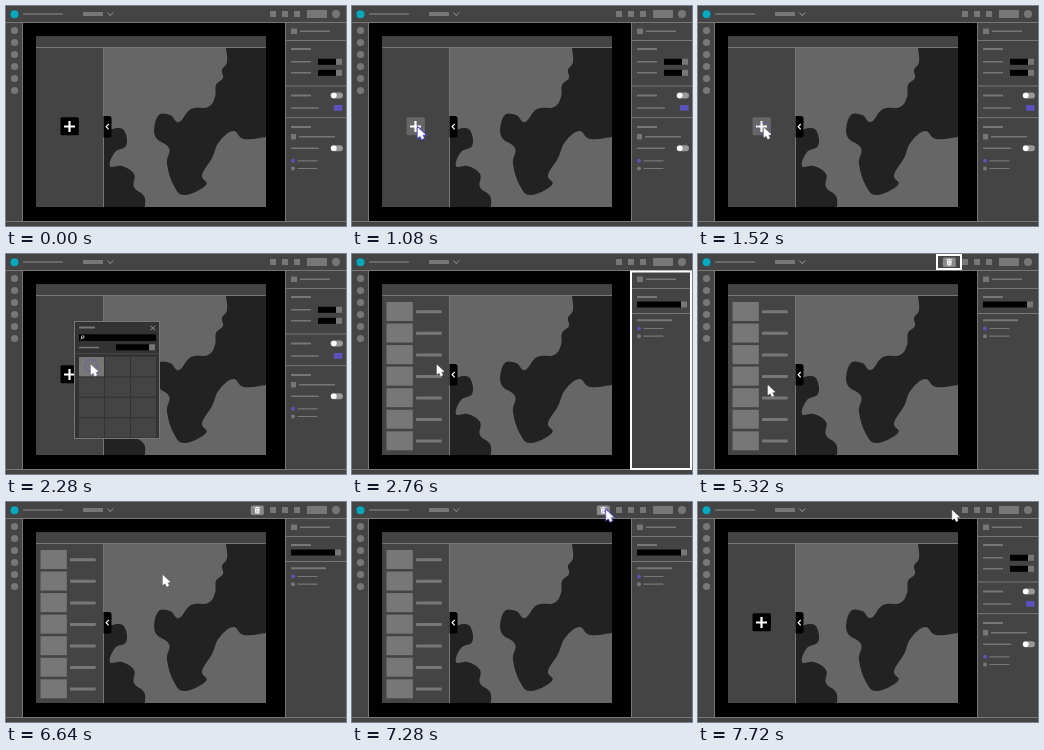
An HTML page that plays this animation: 340 by 220 pixels, repeating every 9.6 s.

```html
<!DOCTYPE html>
<html lang="en">
<head>
<meta charset="utf-8">
<title>Panel editor</title>
<style>
  html, body { margin: 0; width: 100%; height: 100%; overflow: hidden; background: #000; }
  svg { display: block; width: 340px; height: 220px; }
</style>
</head>
<body>
<svg id="stage" viewBox="0 0 340 220"></svg>
<script>
const LOOP = 9600;
const GRAY = '#777', BAR = '#444', PURPLE = '#5b52bb';

const rect = (x, y, w, h, fill, more = '') =>
  `<rect x="${x}" y="${y}" width="${w}" height="${h}" fill="${fill}" ${more}/>`;
const dot = (x, y, r, fill) => `<circle cx="${x}" cy="${y}" r="${r}" fill="${fill}"/>`;
const path = (d, stroke, width) =>
  `<path d="${d}" fill="none" stroke="${stroke}" stroke-width="${width}"/>`;
const bar = (x, y, w, h = 1.5) => rect(x, y - h / 2, w, h, GRAY, 'rx=".5"');
const rule = y => path(`M280 ${y}H340`, GRAY, 1);
const group = (id, body) => `<g id="${id}">${body}</g>`;
const repeat = (n, draw) => Array.from({ length: n }, (_, i) => draw(i)).join('');

// Smooth line through points given as "x,y x,y ..."
function curve(text) {
  const p = text.split(' ').map(s => s.split(',').map(Number));
  const at = i => p[Math.min(Math.max(i, 0), p.length - 1)];
  const handle = (i, sign) => at(i).map((v, k) => v + sign * (at(i + 1)[k] - at(i - 1)[k]) / 5);
  return 'M' + p[0] + p.slice(1).map((q, i) => `C${handle(i, 1)} ${handle(i + 1, -1)} ${q}`).join('');
}

function frame() {
  return rect(0, 0, 340, 16, BAR) + rect(0, 17, 16, 198, BAR) +
    rect(280, 17, 60, 198, BAR) + rect(0, 216, 340, 4, BAR) +
    path('M0 16.5H340M16.5 17V215M279.5 17V215M0 215.5H340', GRAY, 1) +
    dot(8.5, 8.3, 4, '#00a9bd') + bar(17, 8, 40) + bar(77, 8, 20, 4) +
    path('M101.5 6.5L104.3 9.7L107 6.5', '#999', 1) +
    repeat(3, i => rect(264 + 12 * i, 5, 6, 6, GRAY)) +
    rect(301, 4, 20, 8, GRAY) + dot(330, 8, 4, GRAY) +
    repeat(6, i => dot(8.5, 24.5 + 12 * i, 3.6, GRAY));
}

function map() {
  const east = curve('220,42 221,56 216,64 217,72 210,79 209,91 202,101 185,103 173,116 164,109 152,110 149,130 163,142 161,158 168,180 179,189 200,179 196,169 206,152 213,136 227,125 238,133 260,131');
  const west = curve('98,127 111,122 119,126 120,140 109,146 104,160 116,160 128,168 128,181 138,190 139,201');
  return rect(30, 30.5, 230, 170.5, '#666') +
    `<path d="${east}V42Z" fill="#222"/><path d="${west}H98Z" fill="#222"/>` +
    rect(30, 30.5, 230, 11, BAR) + rect(30, 42, 68, 159, BAR) +
    path('M30 41.5H260M97.5 42V201', GRAY, 1);
}

const tab = () =>
  '<path d="M97.5 110H103Q105.5 110 105.5 112.5V129Q105.5 131.5 103 131.5H97.5Z"/>' +
  path('M102.7 118L100.2 120.7L102.7 123.4', '#fff', 1.2);

const addButton = () =>
  '<rect id="addBox" x="54.5" y="111.2" width="18.4" height="18" rx="1.5"/>' +
  path('M63.5 115V126M58 120.5H69', '#fff', 2.2);

const list = () => repeat(7, i => {
  const y = 48 + 21.55 * i;
  return rect(34.5, y, 26.3, 19, GRAY) + bar(64, y + 9.8, 25.7, 3);
});

const head = () => rect(285, 22.5, 6, 5.5, GRAY) + bar(294, 25.3, 30) + rule(34.5) + bar(285, 43, 20, 2);
const radios = y => repeat(2, i =>
  dot(287, y + 7.7 * i, 2, i ? GRAY : PURPLE) + bar(291.5, y + 7.7 * i, 20, 1.2));
const toggle = y => rect(324.5, y - 3, 12.5, 6, '#999', 'rx="3"') + dot(327.8, y, 2.8, '#fff');
const input = (x, y, w) => rect(x, y - 3, w, 6, '#000') + rect(x + w, y - 3, 6, 6, GRAY);

const panelPage = () => head() +
  repeat(2, i => bar(285, 55.8 + 11 * i, 20) + input(312, 55.8 + 11 * i, 18)) +
  rule(80) + bar(285, 89.5, 20, 2) + toggle(89.5) +
  bar(285, 102, 28) + rect(328, 99, 8.5, 5.7, PURPLE) +
  rule(111.6) + bar(285, 121, 20, 2) + rect(285, 128, 5, 5.5, GRAY) + bar(293, 130.7, 36) +
  bar(285, 142.3, 28) + toggle(142.3) + radios(154.8);

const panelList = () => head() + input(285, 50.5, 44) + rule(59.5) + bar(285, 66.2, 35, 2) + radios(74.5);

const dialog = () => rect(68.5, 67.5, 85, 117, '#333', `stroke="${GRAY}"`) +
  bar(73, 73.6, 16, 2) + path('M144.5 71.7L149 76.2M149 71.7L144.5 76.2', '#999', .9) +
  rect(73, 80.3, 77, 6.6, '#000') +
  '<circle cx="76.8" cy="83" r="1.3" fill="none" stroke="#fff" stroke-width=".7"/>' +
  path('M75.9 84L74.7 85.4', '#fff', .7) +
  bar(73, 93.6, 20) + input(110, 93.3, 33) + path('M69 99.7H153', '#555', .7) +
  repeat(12, i => rect(73 + 26 * (i % 3), 103 + 20.4 * Math.floor(i / 3), 25, 19.3, BAR,
    i ? '' : 'id="cell"'));

const trash = () => rect(244.8, 3.5, 13, 9.5, '#888', 'rx="1.5"') +
  path('M248.3 5.8H254.3M250.3 5.2H252.3', '#fff', .9) +
  '<path d="M248.9 6.8H253.7L253.3 11.5H249.3Z" fill="#fff"/>' +
  path('M250.6 7.6V10.8M252 7.6V10.8', '#888', .5);

const outline = (x, y, w, h) => rect(x, y, w, h, 'none', 'stroke="#fff" stroke-width="2"');

const ARROW = 'M0 0V9.3L2.2 7.5L3.9 11L5.7 10.1L4.1 6.8L7 6.5Z';
const cursor = () =>
  `<path id="press" d="${ARROW}" stroke="#5148d8" stroke-width="2.2"/>` +
  `<path d="${ARROW}" fill="#fff" stroke="#fff" stroke-width=".6"/>`;

const stage = document.getElementById('stage');
stage.innerHTML = frame() + map() + group('add', addButton()) + group('list', list()) + tab() +
  group('panelPage', panelPage()) + group('panelList', panelList()) +
  group('panelGlow', outline(279, 17.5, 60, 197.5)) +
  group('trash', trash()) + group('trashGlow', outline(239, 1, 24, 14)) +
  group('dialog', dialog()) +
  '<circle id="ring" fill="none" stroke="#5148d8"/>' + group('cursor', cursor());

const el = {};
stage.querySelectorAll('[id]').forEach(n => el[n.id] = n);

const part = (t, a, b) => Math.min(1, Math.max(0, (t - a) / (b - a)));
const ease = v => v * v * (3 - 2 * v);
const within = (t, a, b) => t >= a && t < b;
const blink = (t, start, step) => within(t, start, start + step) || within(t, start + 2 * step, start + 3 * step);
const show = (node, on) => node.setAttribute('display', on ? 'inline' : 'none');
const shade = (a, b, v) => { const c = Math.round(a + (b - a) * v); return `rgb(${c},${c},${c})`; };

const moves = [
  { from: 80, to: 1040, x: 66, y: 122 },
  { from: 1740, to: 2060, x: 85, y: 111 },
  { from: 4380, to: 4680, x: 70, y: 131.5 },
  { from: 6345, to: 6960, x: 254.3, y: 8.5 }
];
const clicks = [[1080, 1560], [2040, 2320], [4500, 5320], [7160, 7720]];

function cursorAt(t) {
  let x = 128, y = 103;
  for (const m of moves) {
    const k = ease(part(t, m.from, m.to));
    x += (m.x - x) * k;
    y += (m.y - y) * k;
  }
  return [x, y];
}

function draw(t) {
  const [x, y] = cursorAt(t);
  el.cursor.setAttribute('transform', `translate(${x} ${y})`);
  el.cursor.setAttribute('opacity', part(t, 40, 200));

  const click = clicks.find(([a, b]) => within(t, a, b));
  show(el.ring, click);
  show(el.press, click);
  if (click) {
    const k = part(t, ...click);
    el.press.setAttribute('opacity', 1 - k);
    el.ring.setAttribute('cx', x);
    el.ring.setAttribute('cy', y + .5);
    el.ring.setAttribute('r', 7 * k);
    el.ring.setAttribute('opacity', 1 - .7 * k);
  }

  const listed = within(t, 2320, 7720);
  show(el.add, !listed);
  show(el.panelPage, !listed);
  show(el.list, listed);
  show(el.panelList, listed);
  show(el.dialog, within(t, 1560, 2320));
  show(el.panelGlow, blink(t, 2760, 400));
  show(el.trash, within(t, 5320, 7720));
  show(el.trashGlow, blink(t, 5320, 345));

  el.addBox.setAttribute('fill', shade(0, 102, t < 1560 ? part(t, 840, 1000) : 0));
  el.cell.setAttribute('fill', shade(68, 119, part(t, 1840, 2000)));
}

function tick(now) {
  draw(now % LOOP);
  requestAnimationFrame(tick);
}
draw(0);
requestAnimationFrame(tick);
</script>
</body>
</html>
```
